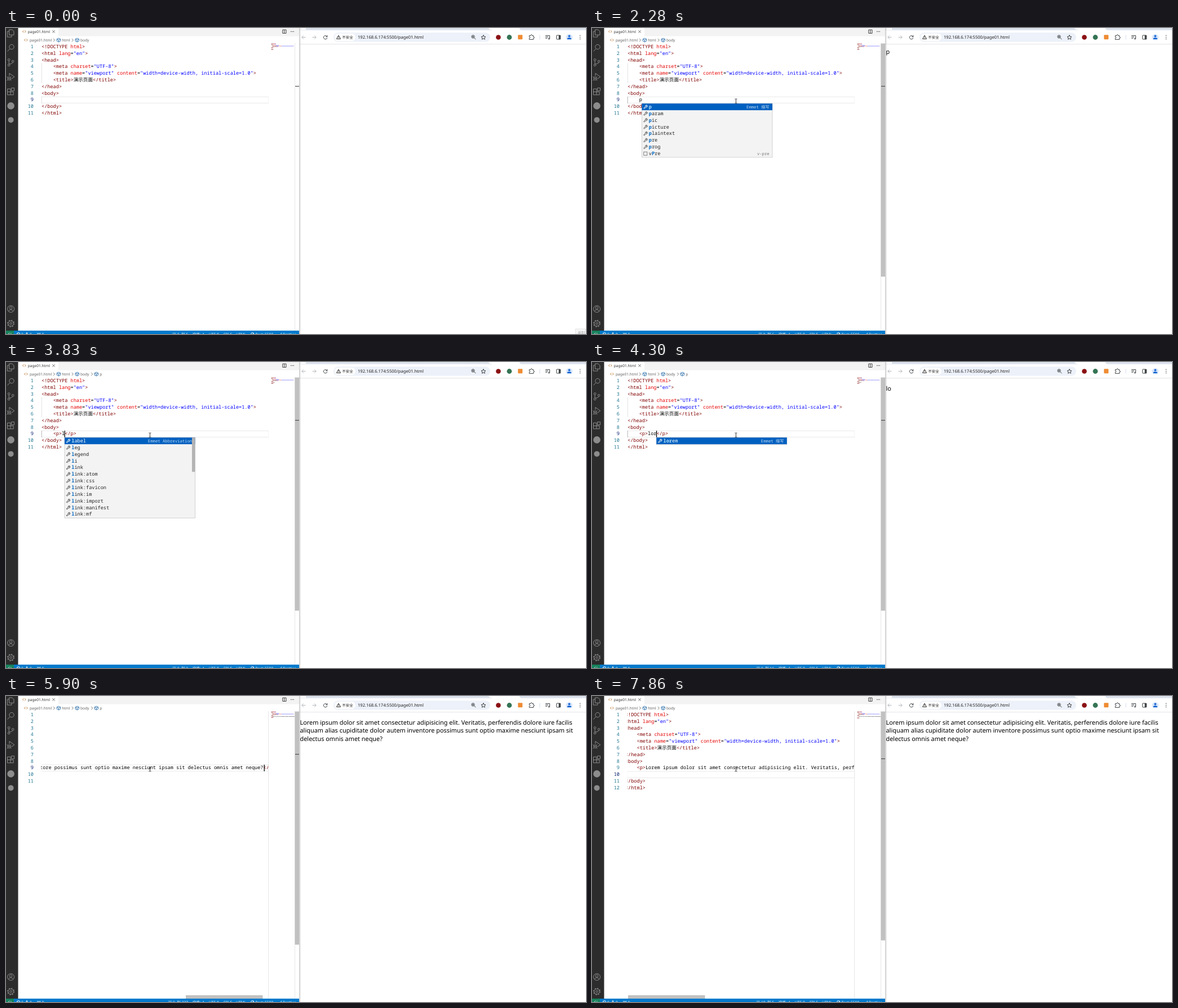
These frames come from a looping animation (1029 px wide and 544 px high, 8000 ms). An HTML page:

```html
<!DOCTYPE html>
<html lang="en">
<head>
<meta charset="UTF-8">
<title>Editor and live preview</title>
<style>
  html, body { margin: 0; width: 100%; height: 100%; overflow: hidden; background: #fff; }
  svg { display: block; width: 100%; height: 100%; }
  text { font: 6.6px "Noto Sans", "Noto Sans CJK SC", sans-serif; text-rendering: geometricPrecision; }
  .code { font: 8.595px "Noto Sans Mono", "Noto Sans CJK SC", monospace; }
  .hint { font: 7.25px "Noto Sans Mono", "Noto Sans CJK SC", monospace; }
  .page { font-size: 10.9px; }
  .url { font-size: 7.6px; }
  .end { text-anchor: end; }
  .match { font-weight: 700; }
  .line { fill: none; stroke-width: 1; }
</style>
</head>
<body>
<svg viewBox="0 0 1029 544" preserveAspectRatio="none">
  <defs>
    <clipPath id="codeClip"><rect x="62.5" y="27" width="403.5" height="511"/></clipPath>
    <clipPath id="mapClip"><rect x="466" y="27" width="46" height="511"/></clipPath>
    <linearGradient id="shade"><stop stop-color="#999"/><stop offset="1" stop-color="#999" stop-opacity="0"/></linearGradient>
    <g id="cube" class="line" stroke="#3a78b0" stroke-width=".8"><path d="M0-3.3 3.2-1.8V1.7L0 3.3-3.2 1.7V-1.8ZM-3.2-1.8 0-.2 3.2-1.8M0-.2V3.3"/></g>
    <path id="chevron" class="line" stroke="#777" stroke-width=".8" d="M-1.3-2.6 1.3 0-1.3 2.6"/>
    <path id="tag" class="line" stroke="#b8752e" stroke-width=".9" d="M-.9-1.9-2.8 0-.9 1.9M.9-1.9 2.8 0 .9 1.9"/>
    <path id="wrench" class="line" stroke-width=".9" d="M-3.2 2.4 0-.6C-.6-2.4 1-3.6 2.6-3L1.1-1.4 1.9-.6 3.3-2C3.8 0 2.2 1.3.8.8L-2.2 3.4Z"/>
  </defs>

  <!-- browser -->
  <rect x="520" width="509" height="29" fill="#fff"/>
  <path d="M532 0H856Q858 3.6 862 3.6H532ZM911 0H1029V3.6H915Q911 3.6 911 0Z" fill="#dde3ec"/>
  <path d="M520 3.6H862M913 3.6H1029" stroke="#dde3ec" stroke-width=".8"/>
  <path d="M520 28.7H1029" stroke="#e1e3e6" stroke-width=".9"/>
  <rect x="581" y="8.2" width="278" height="16.4" rx="8.2" fill="#edf1f9"/>
  <rect x="583" y="10" width="37" height="13" rx="6.5" fill="#fff"/>
  <path d="M590 13 593.6 19.4H586.4ZM590 15.2V17M590 17.7V18.5" class="line" stroke="#333" stroke-width=".9"/>
  <text x="596.2" y="19" fill="#222" style="font-size:6.5px">不安全</text>
  <text x="624" y="19.2" fill="#222" class="url">192.168.6.174:5500/page01.html</text>
  <g class="line" stroke="#b5b8bc"><path d="M531.5 16.5H525M528 13.3 524.8 16.5 528 19.7M543.5 16.5H550M547 13.3 550.2 16.5 547 19.7"/></g>
  <g class="line" stroke="#3c4043">
    <circle cx="828.6" cy="15.4" r="2.6"/><path d="M830.5 17.3 833.4 20.2M827.2 15.4H830M828.6 14V16.8"/>
    <path d="M847 12.5 848.2 15.2 851 15.5 848.9 17.4 849.5 20.2 847 18.7 844.5 20.2 845.1 17.4 843 15.5 845.8 15.2Z"/>
    <path d="M928.3 13.6H931Q931 11.8 932.3 11.8T933.6 13.6H935.7V15.8Q937.3 15.8 937.3 17T935.7 18.2V20.4H928.3V18.3Q930 18 930 17T928.3 15.7Z"/>
    <path d="M957 13.4H964.6M957 15.8H962M957 18.2H960.4M964.6 13.4V19"/><circle cx="963.4" cy="19" r="1.1"/>
    <rect x="976.7" y="13" width="7" height="7" rx=".6"/>
  </g>
  <rect x="980.6" y="13" width="3.1" height="7" fill="#3c4043"/>
  <circle cx="873.5" cy="16.5" r="4.3" fill="#8b1014"/>
  <circle cx="893" cy="16.5" r="4.4" fill="#347454"/>
  <rect x="908.3" y="12.2" width="8" height="8" rx="1" fill="#ef8b32"/>
  <path d="M947 12.5V20.5" stroke="#d4dcec"/>
  <circle cx="999.3" cy="16.5" r="5.8" fill="#d8e6fc"/>
  <circle cx="999.3" cy="14.3" r="1.9" fill="#1967d2"/><path d="M995.5 20Q995.5 17 999.3 17T1003.1 20Z" fill="#1967d2"/>
  <path d="M1018.5 12.4V20.8" stroke="#3c4043" stroke-width="1.5" stroke-linecap="round" stroke-dasharray="0 3.2" transform="translate(0 .8)"/>

  <!-- editor frame -->
  <rect x="520" width="3.5" height="544" fill="url(#shade)" opacity=".55"/>
  <rect width="520" height="544" fill="#fff"/>
  <rect x="93" width="427" height="14.5" fill="#f3f3f3"/>
  <use href="#tag" x="32.3" y="6.3"/><text x="38.7" y="8.9" fill="#333">page01.html</text>
  <path d="M82.3 4.2 86.7 8.6M86.7 4.2 82.3 8.6" stroke="#424242" stroke-width=".8"/>
  <path d="M490.8 3.2H497V9.4H490.8ZM493.9 3.2V9.4" class="line" stroke="#424242" stroke-width=".9"/>
  <path d="M505 6.4H511" stroke="#424242" stroke-width="1.2" stroke-dasharray="1.2 1.2"/>
  <use href="#tag" x="35.3" y="21.4"/>
  <g fill="#616161"><text x="42" y="24">page01.html</text><text x="99.3" y="24">html</text><text x="132" y="24">body</text></g>
  <use href="#chevron" x="85.3" y="21.5"/><use href="#cube" x="93.5" y="21.5"/>
  <use href="#chevron" x="118" y="21.5"/><use href="#cube" x="126.2" y="21.5"/>
  <rect width="21.5" height="538" fill="#2c2c2c"/>
  <g class="line" stroke="#8c8c8c" stroke-width="1.1">
    <path d="M5.5 3H10.8L14 6.2V12.3H5.5ZM5.5 6H2.3V16H10V12.3"/>
    <circle cx="10" cy="33.6" r="4.2"/><path d="M7 36.8 2.6 41.4"/>
    <circle cx="5.2" cy="56.5" r="1.8"/><circle cx="5.2" cy="66" r="1.8"/><circle cx="12.2" cy="59.3" r="1.8"/><path d="M5.2 58.3V64.2M12.2 61.1Q12 63.4 5.8 64.2"/>
    <path d="M6 85V80.5L14.8 86.8 8.6 91"/><ellipse cx="5.4" cy="89.8" rx="2.3" ry="3"/><path d="M3.1 89.8H7.7M1.5 86.6 3.5 88M9.3 86.6 7.3 88M1.4 93.4 3.5 91.8M9.4 93.4 7.3 91.8"/>
    <path d="M2.5 108.2H8V118.8H2.5ZM2.5 113.5H13.2V118.8H8M9.6 106.6H14.6V111.6H9.6Z"/>
    <circle cx="8.6" cy="499.5" r="6"/><circle cx="8.6" cy="497.6" r="2.3"/><path d="M4.6 503.8Q5.4 500.7 8.6 500.7T12.6 503.8"/>
    <circle cx="8.6" cy="525.4" r="4.7"/><circle cx="8.6" cy="525.4" r="1.8"/><circle cx="8.6" cy="525.4" r="5.7" stroke-width="1.6" stroke-dasharray="2 2.48"/>
  </g>
  <circle cx="8.6" cy="138.4" r="6.3" fill="#8c8c8c"/>
  <circle cx="8.6" cy="163.4" r="5" fill="#8c8c8c"/>
  <path d="M512.5 27V538" stroke="#e2e2e2" stroke-width=".8"/>
  <rect y="538" width="520" height="6" fill="#007acc"/><rect y="538" width="14" height="6" fill="#16825d"/>
  <path d="M4 544 6.5 541.6M8 543.5 9.5 542" stroke="#fff" stroke-width=".8"/>
  <g fill="#fff">
    <text x="27" y="546.8">0</text><text x="42" y="546.8">0</text><text x="63.5" y="546.8">0</text>
    <text x="331" y="546.8">空格: 4</text><text x="360" y="546.8">UTF-8</text><text x="385.5" y="546.8">CRLF</text>
    <text x="408" y="546.8">HTML</text><text x="442.5" y="546.8">Port: 5500</text><text x="491" y="546.8">Prettier</text>
  </g>
  <g class="line" stroke="#fff" stroke-width=".8"><circle cx="22" cy="544.6" r="2.9"/><path d="M20.8 543.4 23.2 545.8M34 547 37 541.5 40 547M55.5 542 57 545M61 542 59.5 545M58.2 542V547M484.5 544.5 486 546 489 542"/><circle cx="437.3" cy="544.6" r="2.9"/><path d="M435.3 546.6 439.3 542.6"/></g>

  <g id="scene"></g>
  <g id="mouse"></g>
</svg>
<script>
const LOOP = 8000, LEFT = 63, CHAR = 5.157, ROW = 11.8;
const LOREM = [
  'Lorem ipsum dolor sit amet consectetur adipisicing elit. Veritatis, perferendis dolore iure facilis',
  'aliquam alias cupiditate dolor autem inventore possimus sunt optio maxime nesciunt ipsam sit',
  'delectus omnis amet neque?'
];
const HEAD = ['<!DOCTYPE html>', '<html lang="en">', '<head>', '    <meta charset="UTF-8">',
  '    <meta name="viewport" content="width=device-width, initial-scale=1.0">',
  '    <title>演示页面</title>', '</head>', '<body>'];
const TAIL = ['</body>', '</html>'];
const CHOICES = {
  p: ['p', 'param', 'pic', 'picture', 'plaintext', 'pre', 'prog', 'vPre'],
  l: ['label', 'leg', 'legend', 'li', ...['', ':atom', ':css', ':favicon', ':im', ':import', ':manifest', ':mf'].map(s => 'link' + s)]
};

// Each step changes part of the state; "tagged" means typed text sits inside <p></p>.
const STEPS = [
  [0, { typed: '', tagged: false, caret: false, popup: '', page: [], loading: false, crumb: false, enter: false }],
  [830, { caret: true }], [1290, { caret: false }], [1750, { caret: true }],
  [1830, { typed: 'p' }], [1900, { popup: 'p' }], [1960, { loading: true }],
  [2090, { page: ['p'], loading: false }], [2280, { caret: false }], [2760, { caret: true }],
  [2830, { typed: '', tagged: true, popup: '' }],
  [3100, { loading: true }], [3170, { loading: false }], [3380, { caret: false, crumb: true }],
  [3660, { page: [] }], [3830, { typed: 'l', popup: 'l', caret: true }],
  [4030, { typed: 'lo', popup: 'lo', loading: true }], [4110, { page: ['l'], loading: false }],
  [4200, { typed: 'lor', popup: 'lor' }], [4280, { page: ['lo'] }],
  [4360, { typed: 'lore', popup: 'lore', loading: true }], [4430, { page: ['lor'], loading: false }],
  [4670, { page: ['lore'] }], [4830, { typed: 'lorem', popup: 'lorem' }],
  [5060, { page: ['lorem'], loading: true }], [5130, { loading: false }], [5330, { caret: false }],
  [5610, { typed: LOREM.join(' '), popup: '', caret: true }],
  [5830, { loading: true, page: LOREM }], [5900, { loading: false }],
  [6100, { caret: false }], [6560, { caret: true }], [7090, { caret: false }],
  [7290, { enter: true, caret: true }], [7490, { loading: true }], [7560, { loading: false }],
  [7770, { caret: false }], [7860, { crumb: false }]
];

const scene = document.getElementById('scene');
const mouse = document.getElementById('mouse');
const escape = s => s.replace(/&/g, '&amp;').replace(/</g, '&lt;');
const rect = (x, y, w, h, fill, more = '') => `<rect x="${x}" y="${y}" width="${w}" height="${h}" fill="${fill}" ${more}/>`;
const text = (x, y, body, fill, cls = '') => `<text x="${x}" y="${y}" fill="${fill}" class="${cls}">${body}</text>`;
const baseline = row => 36 + row * ROW;

function tokens(line) {
  const pattern = /(<[!\/]?\w+|>)|("[^"]*")|([\w-]+(?==|>$))|[^<>"=\w]+|\w+|=/g;
  return [...line.matchAll(pattern)].map(m => ({
    at: m.index, body: m[0], color: m[1] ? '#800000' : m[2] ? '#0000ff' : m[3] ? '#e50000' : '#000'
  }));
}

function codeLine(line, row) {
  const indent = line.search(/\S/);
  if (indent < 0) return '';
  const spans = tokens(line.slice(indent)).map(t => `<tspan fill="${t.color}">${escape(t.body)}</tspan>`).join('');
  return text(LEFT + indent * CHAR, baseline(row), spans, '#000', 'code');
}

function mapLine(line, row) {
  return tokens(line).filter(t => t.body.trim()).map(t =>
    rect(470.5 + t.at * .54, 27.4 + row * 1.07, t.body.length * .54, .8, t.color, 'opacity=".5"')).join('');
}

function popup(key, x) {
  const items = CHOICES[key] || ['lorem'];
  const step = 11.85, top = 134.3, width = 231.5;
  let out = rect(x, top, width, items.length * step + .8, '#f3f3f3', 'stroke="#c8c8c8" stroke-width=".8"') +
    rect(x, top, width, step, '#0060c0');
  items.forEach((item, i) => {
    const y = top + i * step, chosen = i === 0;
    const label = item.replace(new RegExp(key, 'i'), m =>
      `<tspan class="match" fill="${chosen ? '#bbe7ff' : '#0066bf'}">${m}</tspan>`);
    out += item === 'vPre'
      ? rect(x + 3.3, y + 3, 6, 6, 'none', 'stroke="#666" stroke-width=".8"')
      : `<use href="#wrench" x="${x + 6.3}" y="${y + 5.9}" stroke="${chosen ? '#fff' : '#555'}"/>`;
    out += text(x + 12.3, y + 8.7, label, chosen ? '#fff' : '#222', 'code');
    const hint = chosen ? (key === 'l' ? 'Emmet Abbreviation' : 'Emmet 缩写') : item === 'vPre' ? 'v-pre' : '';
    if (hint) out += text(x + width - 5.3, y + 8.4, hint, chosen ? '#c5daf1' : '#777', 'hint end');
  });
  if (key === 'l') out += rect(x + width - 5.5, top, 5.5, 61, '#b4b4b4');
  return out;
}

function draw(s, sliderShown) {
  const line = s.tagged ? `    <p>${s.typed}</p>` : '    ' + s.typed;
  const lines = [...HEAD, line, ...(s.enter ? ['    '] : []), ...TAIL];
  const long = s.typed.length > 9;
  const row = s.enter ? 9 : 8;
  const col = s.enter ? 4 : 4 + (s.tagged ? 3 : 0) + s.typed.length;
  const full = LEFT + col * CHAR;
  const scroll = s.enter ? 4.1 : long ? full - 458.3 : 0;
  const lineTop = 122.3 + (row - 8) * ROW;

  let out = `<g clip-path="url(#codeClip)">` +
    rect(62, lineTop, 404, 11.2, 'none', 'stroke="#e8e8e8" stroke-width=".9"') +
    `<g transform="translate(${-scroll} 0)">` +
    rect(LEFT - .3, 62.5, .8, 35.4, '#d3d3d3') +
    rect(LEFT - .3, 122, .8, 11.8, line.trim() ? '#939393' : '#d3d3d3') +
    lines.map(codeLine).join('') + '</g></g>';
  if (s.caret) out += rect(full - scroll - .7, lineTop - .2, 1.3, 11.7, '#000');
  lines.forEach((_, i) => out += text(49, baseline(i), i + 1, i === row ? '#0b216f' : '#237893', 'code end'));
  out += `<g clip-path="url(#mapClip)">${lines.map(mapLine).join('')}</g>`;

  if (sliderShown) out += rect(512.5, 27.5, 7.5, s.enter ? 407 : 414.5, '#c1c1c1');
  out += rect(513, s.enter ? 111 : 103, 7, 1.1, '#444');
  if (long) out += rect(465.3, 27, .8, 511, '#dedede') + rect(s.enter ? 64 : 319, 532, 136.5, 6, '#c1c1c1');
  if (s.crumb) out += '<use href="#chevron" x="152.5" y="21.5"/><use href="#cube" x="160.3" y="21.5"/>' + text(166.3, 24, 'p', '#616161');
  out += text(323, 546.8, `行 ${row + 1}, 列 ${col + 1}`, '#fff', 'end');

  out += `<path class="line" stroke="#3c4043" d="${s.loading
    ? 'M563.7 13.7 569.9 19.9M569.9 13.7 563.7 19.9'
    : 'M569.3 14.9A3.2 3.2 0 1 0 569.8 17.4M570 13V15.6H567.3'}"/>`;
  const first = s.page[0] === 'p' ? 46.2 : 51.4;
  s.page.forEach((body, i) => out += text(521.5, first + i * 14.05, body, '#000', 'page'));
  if (s.popup) out += popup(s.popup, full - .3);
  return out;
}

function pointer(t) {
  if (t < 70) return null;
  if (t >= 770) return [255.4, 130];
  const p = Math.min(8, Math.floor((t - 70) / 68.5) + 1) / 8;
  const left = (1 - p) ** 2;
  return [258 + 762 * left, 131 + 405 * left];
}

function drawPointer(at) {
  if (!at) return rect(1010.5, 535, 18, 9, '#f7f7f7', 'stroke="#ddd" stroke-width=".8"') + text(1014, 544.2, '录制', '#aaa');
  const shape = at[0] < 520
    ? '<path class="line" stroke="#333" stroke-width=".9" d="M-2-4H-.6L0-3.4.6-4H2M0-3.4V3.4M-2 4H-.6L0 3.4.6 4H2"/>'
    : '<path fill="#fff" stroke="#000" stroke-width=".6" d="M0 0V9L2.1 7.1 3.5 10.2 4.9 9.5 3.5 6.5H6.3Z"/>';
  return `<g transform="translate(${at})">${shape}</g>`;
}

const shown = new Map();
function put(node, key, make) {
  if (shown.get(node) === key) return;
  shown.set(node, key);
  node.innerHTML = make();
}

function frame(now) {
  const t = now % LOOP;
  const past = STEPS.filter(([at]) => at <= t);
  const at = pointer(t);
  const sliderShown = !!at && at[0] < 520;
  put(scene, past.length + '/' + sliderShown, () => draw(Object.assign({}, ...past.map(p => p[1])), sliderShown));
  put(mouse, String(at), () => drawPointer(at));
  requestAnimationFrame(frame);
}
const start = performance.now();
const tick = () => frame(Math.max(0, performance.now() - start));
tick();
</script>
</body>
</html>
```
